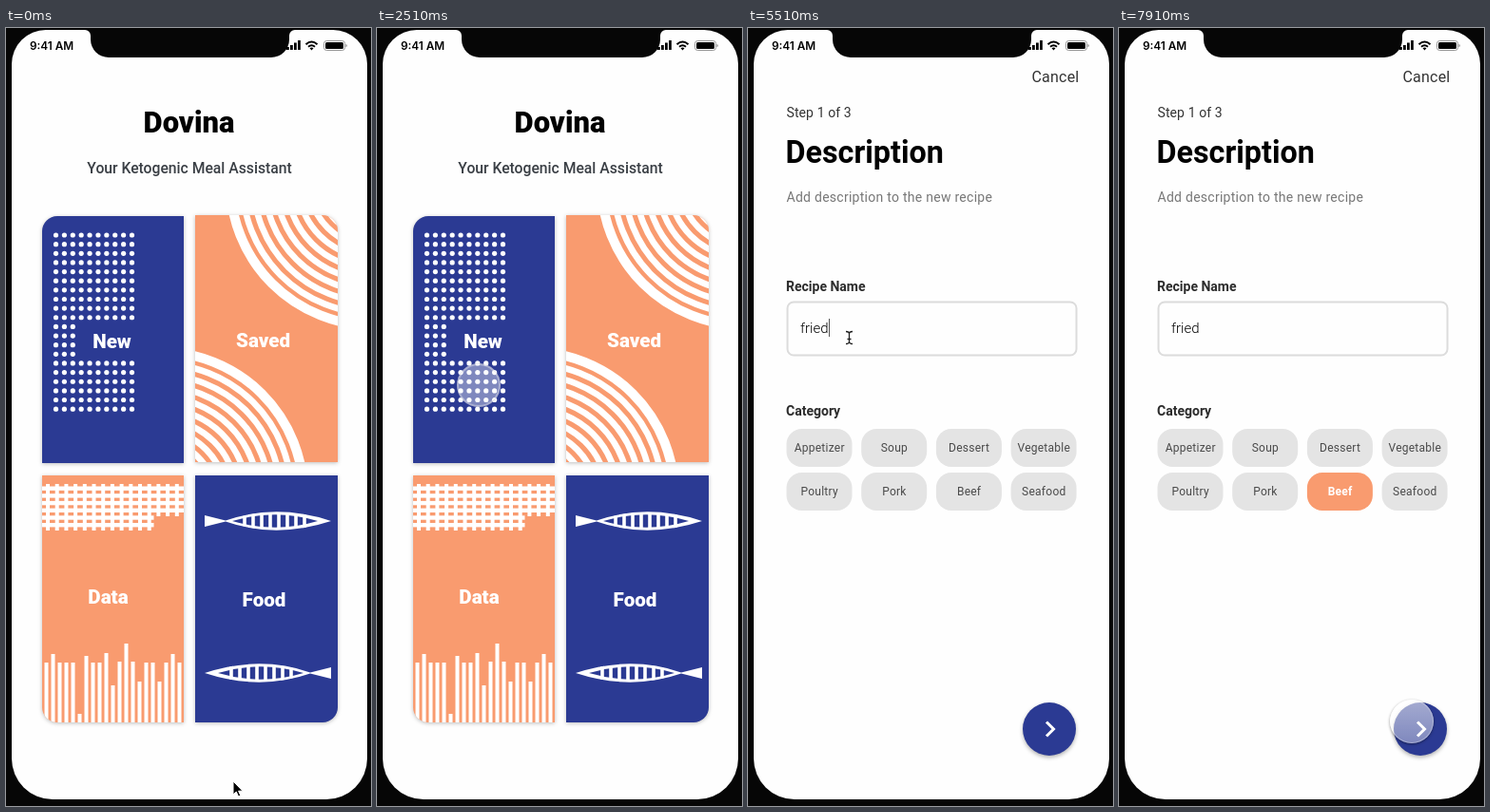
These frames come from a looping animation (384x819 px, 8 s). An HTML page:

```html
<!DOCTYPE html>
<html lang="en">
<head>
<meta charset="utf-8">
<title>Meal assistant</title>
<style>
:root { --blue: #2b3a93; --orange: #f99b6f; --loop: 8s step-end infinite; }
html, body { margin: 0; width: 100%; height: 100%; overflow: hidden; background: #060606; }
#stage { position: relative; width: 384px; height: 819px; overflow: hidden; font-family: Roboto, sans-serif; }
#stage > *, .page > * { position: absolute; }
svg { display: block; }
.full { left: 0; top: 0; width: 384px; height: 819px; }
.home { animation: home var(--loop); }
.form { animation: form var(--loop); }
.mid { text-anchor: middle; }

.card { overflow: hidden; width: 150px; height: 260px; box-shadow: 0 1px 4px rgba(0, 0, 0, .26); }
.blue { background: var(--blue); }
.orange { background: var(--orange); }
.label { font-weight: 900; font-size: 20.6px; fill: #fff; text-anchor: middle; }

.chip rect { fill: #e4e4e4; }
.chip text { font-size: 12px; letter-spacing: .25px; fill: #4a4a4a; text-anchor: middle; }
.chip.pick rect { animation: pick-box var(--loop); }
.chip.pick text { animation: pick-text var(--loop); }

.field { left: 55px; top: 306px; height: 20px; line-height: 20px; font-weight: 300; white-space: pre;
  animation: type var(--loop); --n: 0; }
.field span { font-size: calc(clamp(0, var(--n) - var(--i), 1) * 15px); color: #000; }
.field b { display: inline-block; width: 1px; height: 19px; vertical-align: top; background: #555; animation: caret var(--loop); }
.field em { position: absolute; left: 0; top: 0; font-style: normal; font-size: 15px; color: #ccc; opacity: calc(1 - min(var(--n), 1)); }
.fab { left: 289px; top: 710px; width: 56px; height: 56px; border-radius: 50%; background: var(--blue);
  box-shadow: 0 2px 4px rgba(0, 0, 0, .3); }

.arrow { animation: arrow var(--loop); }
.beam { animation: beam var(--loop); }
.touch { left: -23px; top: -23px; width: 46px; height: 46px; border-radius: 50%;
  animation: move var(--loop), press var(--loop); }

@keyframes home { 0% { visibility: visible } 35.125%, 100% { visibility: hidden } }
@keyframes form { 0% { visibility: hidden } 35.125%, 100% { visibility: visible } }
@keyframes arrow { 0% { opacity: 1 } 7.5%, 100% { opacity: 0 } }
@keyframes beam {
  0% { opacity: 0; transform: none }
  46.375% { opacity: 1; transform: none }
  70.75% { opacity: 1; transform: translate(4px, 10px) }
  72.625%, 100% { opacity: 0 }
}
@keyframes caret {
  0% { opacity: 0 } 46.375% { opacity: 1 } 52% { opacity: 0 }
  57.625% { opacity: 1 } 72.625%, 100% { opacity: 0 }
}
@keyframes type {
  0% { --n: 0 } 57.625% { --n: 1 } 59.5% { --n: 2 } 61.375% { --n: 3 }
  63.25% { --n: 4 } 67%, 100% { --n: 5 }
}
@keyframes pick-box { 0% { fill: #e4e4e4 } 83.875%, 100% { fill: #f99b6f } }
@keyframes pick-text { 0% { fill: #4a4a4a; font-weight: 400 } 83.875%, 100% { fill: #fff; font-weight: 700 } }
@keyframes move {
  0% { opacity: 0; transform: translate(239px, 794px) }
  7.5% { opacity: 1; transform: translate(190px, 789px) }
  9.25% { opacity: 1; transform: translate(102px, 788px) }
  13% { opacity: 1; transform: translate(84px, 720px) }
  14.875% { opacity: 1; transform: translate(60px, 600px) }
  16.625% { opacity: 1; transform: translate(58px, 510px) }
  18.5% { opacity: 1; transform: translate(73px, 449px) }
  22.125% { opacity: 1; transform: translate(77px, 438px) }
  24% { opacity: 1; transform: translate(98px, 395px) }
  25.875% { opacity: 1; transform: translate(107px, 376px) }
  42.625% { opacity: 1; transform: translate(107px, 363px) }
  44.5% { opacity: 1; transform: translate(106px, 327px) }
  46.375% { opacity: 0; transform: translate(106px, 327px) }
  72.625% { opacity: 1; transform: translate(136px, 376px) }
  74.5% { opacity: 1; transform: translate(190px, 460px) }
  76.375% { opacity: 1; transform: translate(226px, 501px) }
  78.25% { opacity: 1; transform: translate(230px, 490px) }
  89.5% { opacity: 1; transform: translate(250px, 545px) }
  91.375% { opacity: 1; transform: translate(281px, 629px) }
  95.125% { opacity: 1; transform: translate(284px, 645px) }
  97% { opacity: 1; transform: translate(300px, 700px) }
  98.875%, 100% { opacity: 1; transform: translate(308px, 730px) }
}
@keyframes press {
  0%, 35.125%, 89.5%, 100% {
    background: linear-gradient(rgba(255, 255, 255, .58), rgba(255, 255, 255, .4));
    box-shadow: 0 1px 3px rgba(0, 0, 0, .45), inset 0 0 0 1px rgba(255, 255, 255, .3);
  }
  31.375%, 83.875% {
    background: linear-gradient(rgba(255, 255, 255, .4), rgba(255, 255, 255, .4));
    box-shadow: inset 0 0 0 1px rgba(150, 150, 170, .2), inset 0 0 0 2px rgba(255, 255, 255, .35);
  }
}
</style>
</head>
<body>
<div id="stage">
  <svg class="full" viewBox="0 0 384 819">
    <path fill="#fefefe" d="M42 2H83A6 6 0 0 1 89 8V12A19 19 0 0 0 108 31H279A19 19 0 0 0 298 12V8A6 6 0 0 1 304 2H344A36 36 0 0 1 380 38V769A43 43 0 0 1 337 812H49A43 43 0 0 1 6 769V38A36 36 0 0 1 42 2Z"/>
    <text x="25" y="22.5" font-family="Inter, sans-serif" font-size="11.8" font-weight="600">9:41 AM</text>
    <path d="M295 20h2.8v3H295zM299 18h2.8v5H299zM303 15.5h2.8v7.5H303zM307 13h2.8v10H307z"/>
    <g fill="none" stroke="#000" stroke-width="2">
      <path d="M315.5 17.2Q321.5 11.8 327.5 17.2M318 19.8Q321.5 16.8 325 19.8"/>
      <rect x="334.5" y="13.5" width="22" height="10" rx="2.8" stroke="#999" stroke-width="1"/>
    </g>
    <path d="M319.5 21.3Q321.5 19.7 323.5 21.3L321.5 23.5Z"/>
    <rect x="336" y="15" width="19" height="7" rx="1.5"/>
    <path fill="#999" d="M357.5 17v3.2q1.500-.3 1.500-1.600t-1.500-1.600"/>
  </svg>

  <div class="page home full">
    <svg class="full" viewBox="0 0 384 819">
      <text class="mid" x="192.5" y="110" font-size="31" font-weight="900">Dovina</text>
      <text class="mid" x="193" y="152.5" font-size="15.7" font-weight="500" fill="#3a3f45">Your Ketogenic Meal Assistant</text>
    </svg>
    <div class="card blue" style="left:37.5px;top:198px;width:149.500px;border-radius:16px 0 0 0">
      <svg width="150" height="260" viewBox="37.500 198 150 260">
        <g id="dots" fill="#fff"></g>
        <text class="label" x="111" y="336.5">New</text>
      </svg>
    </div>
    <div class="card orange" style="left:199px;top:197px;border-radius:0 16px 0 0">
      <svg width="150" height="260" viewBox="199 197 150 260">
        <g id="rings" fill="none" stroke="#fff"></g>
        <text class="label" x="270.5" y="335.5">Saved</text>
      </svg>
    </div>
    <div class="card orange" style="left:37.5px;top:471px;width:149.500px;border-radius:0 0 0 16px">
      <svg width="150" height="260" viewBox="37.500 471 150 260">
        <g id="chart" fill="#fff"></g>
        <text class="label" x="107" y="606">Data</text>
      </svg>
    </div>
    <div class="card blue" style="left:199px;top:471px;border-radius:0 0 16px 0">
      <svg width="150" height="260" viewBox="199 471 150 260">
        <clipPath id="body"><path d="M231 519Q284 500 342 519Q284 538 231 519Z"/></clipPath>
        <g id="fish">
          <path fill="#fff" d="M209 513L231 518.5Q284 500 342 519Q284 538 231 519.5L209 525Z"/>
          <path fill="#2b3a93" d="M238 519Q283 505.5 328 519Q283 532.5 238 519Z"/>
          <path id="ribs" stroke="#fff" stroke-width="3.6" clip-path="url(#body)"/>
        </g>
        <use href="#fish" transform="rotate(180 275.5 599)"/>
        <text class="label" x="271.5" y="609">Food</text>
      </svg>
    </div>
  </div>

  <div class="page form full">
    <svg class="full" viewBox="0 0 384 819">
      <text x="298.5" y="57" font-size="16" letter-spacing=".2" fill="#333">Cancel</text>
      <text x="40.5" y="94" font-size="14" letter-spacing=".1" fill="#333">Step 1 of 3</text>
      <text x="39.5" y="142" font-size="32.3" font-weight="700">Description</text>
      <text x="40.5" y="183" font-size="14" letter-spacing=".27" fill="#777">Add description to the new recipe</text>
      <g font-size="14" font-weight="700" fill="#2c2c2c">
        <text x="40" y="277">Recipe Name</text>
        <text x="40" y="408">Category</text>
      </g>
      <rect x="41.5" y="288.5" width="304" height="56" rx="6.5" fill="none" stroke="#dcdcdc" stroke-width="2"/>
      <g id="chips"></g>
    </svg>
    <div class="field"><span style="--i:0">f</span><span style="--i:1">r</span><span style="--i:2">i</span><span style="--i:3">e</span><span style="--i:4">d</span><b></b><em>i.e. Fried Tomatoes with Eggs</em></div>
    <div class="fab">
      <svg width="56" height="56"><path d="M25 20.5L32.5 28L25 35.5" fill="none" stroke="#fff" stroke-width="3"/></svg>
    </div>
  </div>

  <svg class="full" viewBox="0 0 384 819">
    <path class="arrow" stroke="#fff" d="M239 793V807L242.3 804L244.5 809L246.8 808L244.6 803.2H249Z"/>
    <path class="beam" fill="none" stroke="#222" stroke-width="1.3" d="M103 319.5Q106.5 319.5 106.5 322V330Q106.5 332.5 103 332.5M110 319.5Q106.5 319.5 106.5 322M106.5 330Q106.5 332.5 110 332.5M104.5 327.5H108.5"/>
  </svg>
  <div class="touch"></div>
</div>

<script>
const fill = (id, html) => { document.getElementById(id).innerHTML = html; };
const times = (n, draw) => Array.from({ length: n }, (_, i) => draw(i)).join('');
const rect = (x, y, w, h) => `<rect x="${x}" y="${y}" width="${w}" height="${h}"/>`;

// Rows 10 to 13 leave room for the label
fill('dots', times(20, r => times(r > 9 && r < 14 ? 3 : 10, c =>
  `<circle cx="${52 + c * 8.89}" cy="${218 + r * 9.64}" r="2.6"/>`)));

// The outermost ring is the widest
const rings = (x, y) => times(9, i =>
  `<circle cx="${x}" cy="${y}" r="${i ? 149 - i * 11.7 : 150}" stroke-width="${i ? 6.6 : 10}"/>`);
fill('rings', rings(386, 163) + rings(163, 491));

const tops = [668, 659, 668, 668, 668, 722, 661, 668, 668, 658, 692,
  667, 648, 667, 688, 668, 668, 688, 668, 659, 668];
fill('chart',
  times(16, i => rect(41.5 + i * 9.7, 480, 4, i < 12 ? 49 : 34)) +
  times(6, i => rect(37, 482.5 + i * 7.7, i < 4 ? 151 : 118, 4.4)) +
  tops.map((y, i) => rect(40 + i * 7, y, 4, 731 - y)).join(''));

document.getElementById('ribs').setAttribute('d', times(8, i => `M${251 + i * 9} 511V527`));

const names = ['Appetizer', 'Soup', 'Dessert', 'Vegetable', 'Poultry', 'Pork', 'Beef', 'Seafood'];
fill('chips', names.map((name, i) => {
  const x = 40.5 + i % 4 * 78.7, y = i < 4 ? 422 : 468;
  return `<g class="chip${name === 'Beef' ? ' pick' : ''}">
    <rect x="${x}" y="${y}" width="69" height="40" rx="16"/>
    <text x="${x + 34.7}" y="${y + 24}">${name}</text></g>`;
}).join(''));
</script>
</body>
</html>
```
